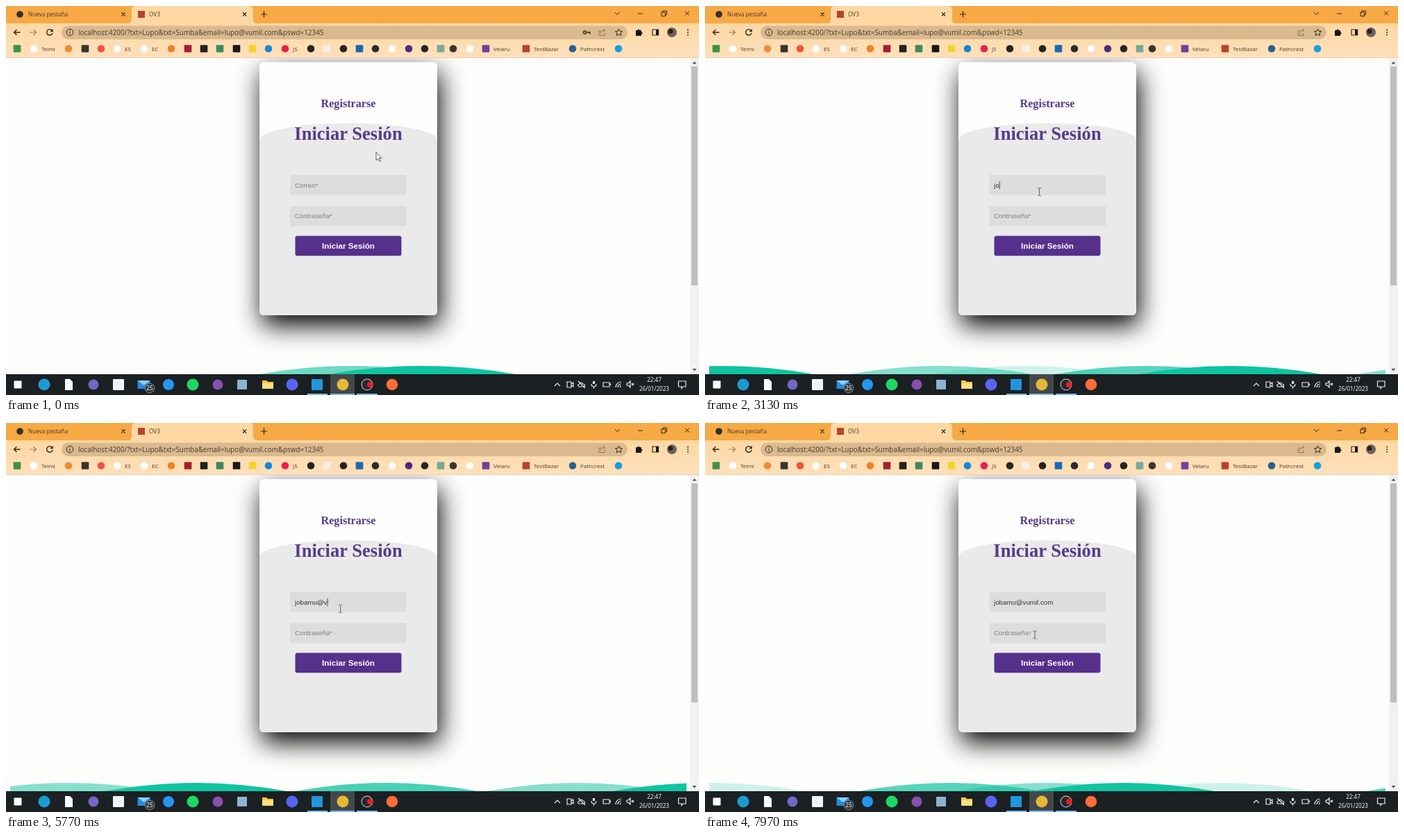
These frames come from a looping animation (998x561 px, 8000 ms). An HTML page:

```html
<!DOCTYPE html>
<html lang="es">
<head>
<meta charset="utf-8">
<title>Iniciar Sesión</title>
<style>
html, body { margin: 0; width: 100%; height: 100%; overflow: hidden; background: #fdfdfc; }
svg { display: block; width: 998px; height: 561px; }
text { white-space: pre; }
.ui { font-family: "Open Sans", "Noto Sans", sans-serif; }
.form { font-family: "Liberation Sans", Arial, sans-serif; font-size: 9.7px; }
.head { font-family: "Liberation Serif", Times, serif; font-weight: bold; fill: #573b8a; text-anchor: middle; }
.line { fill: none; stroke-width: 1.2; }
</style>
</head>
<body>
<svg viewBox="0 0 998 561">
  <defs>
    <filter id="blur" x="-40%" y="-40%" width="180%" height="180%"><feGaussianBlur stdDeviation="18.3"/></filter>
    <clipPath id="pageClip"><path d="M0 75H985V531H0Z"/></clipPath>
    <clipPath id="waveClip"><path d="M6 510H980V531H6Z"/></clipPath>
    <linearGradient id="bar" x2="0" y2="1"><stop stop-color="#fdd8a3"/><stop offset="1" stop-color="#fee0bc"/></linearGradient>
  </defs>
  <rect width="998" height="561" fill="#fdfdfc"/>

  <g clip-path="url(#pageClip)">
    <rect x="368.700" y="95.600" width="256" height="365" rx="6" filter="url(#blur)"/>
    <g id="waves" clip-path="url(#waveClip)" fill="#10c4a0"></g>
  </g>
  <rect x="365" y="81" width="256" height="365" rx="6" fill="#fefefe"/>
  <path d="M365 193A128 24 0 0 1 621 193V440a6 6 0 0 1-6 6H371a6 6 0 0 1-6-6Z" fill="#eaeaea"/>
  <text class="head" x="493" y="146" font-size="16.2">Registrarse</text>
  <text class="head" x="493" y="193" font-size="26.6">Iniciar Sesión</text>
  <g fill="#dedddd">
    <rect x="409" y="243.500" width="168" height="29" rx="3"/>
    <rect x="409" y="288.500" width="168" height="29" rx="3"/>
  </g>
  <text class="form" id="mail" x="416" y="262"></text>
  <text class="form" x="416" y="306" fill="#808080">Contraseña*</text>
  <path id="caret" d="M0 253V264" stroke="#222" stroke-width=".8"/>
  <rect x="416.500" y="331.500" width="153" height="28.700" rx="3" fill="#55318b"/>
  <text class="form" x="493" y="349.500" text-anchor="middle" style="font-size:11.7px" font-weight="bold" fill="#fff">Iniciar Sesión</text>

  <g id="list">
    <path d="M485 281L492 274L499 281Z" fill="#23272a"/>
    <rect id="panel" x="477" y="280" width="158" rx="2" fill="#23272a"/>
  </g>

  <rect x="985" y="75" width="13" height="456" fill="#f1f1f1"/>
  <rect x="987" y="87" width="9" height="316" fill="#bfbfbf"/>
  <path d="M988.500 83.500l3-3.500 3 3.500ZM988.500 523l3 3.500 3-3.500Z" fill="#555"/>

  <g id="browser" class="ui" font-size="8.2" fill="#4a3a28">
    <rect width="998" height="26" fill="#f7a945"/>
    <rect y="25" width="998" height="50" fill="url(#bar)"/>
    <path d="M175 25q6 0 6-6V6q0-6 6-6H350q6 0 6 6v13q0 6 6 6Z" fill="#fdd8a3"/>
    <rect x="80" y="28.500" width="815" height="19.500" rx="9.700" fill="#dab98f"/>
    <circle cx="20" cy="12" r="4.800" fill="#33302c"/>
    <rect x="190" y="7" width="10" height="10" fill="#b5442e"/>
    <text x="32" y="15">Nueva pestaña</text>
    <text x="206" y="15">OV3</text>
    <text x="104" y="41.500" font-size="9.900" id="url"></text>
    <g class="line" stroke="#2e2519">
      <path d="M166.500 9.500l5 5m0-5l-5 5M341 9.500l5 5m0-5l-5 5M367 12h9m-4.500-4.500v9"/>
      <path d="M877 9l3.500 3.500L884 9M910 11h7M944 9h5.500v5.500H944ZM946 9V7h5.500v5.500h-2M978 7.500l6 6m0-6l-6 6" stroke-width="1"/>
      <path d="M20.500 38h-9m4-4l-4 4 4 4M66.500 35.500a4.300 4.300 0 1 0 .6 3.500m0-5.500v3h-3" stroke-width="1.400"/>
      <path d="M34.500 38h9m-4-4l4 4-4 4" stroke="#a17d55"/>
      <circle cx="92" cy="38" r="4.800" stroke-width="1"/><path d="M92 37v3.500m0-5.500v1" stroke-width="1"/>
      <path d="M857 36h-3v6.500h8V39M856.500 40q0-5 6-5m-2-2l2.500 2-2.500 2" stroke="#8d7558" stroke-width="1"/>
      <path d="M882.500 33l1.500 3.300 3.600.4-2.700 2.400.8 3.500-3.200-1.800-3.200 1.800.8-3.500-2.700-2.400 3.600-.4Z" stroke-width="1"/>
      <path d="M931 34h8.500v8H931Z"/>
    </g>
    <g id="key" fill="none" stroke="#5b4931" stroke-width="1.800"><circle cx="833.500" cy="38" r="2"/><path d="M836 38h5v2.500"/></g>
    <path d="M907 35h2.500a1.500 1.500 0 0 1 3 0h2.500v2.500a1.500 1.500 0 0 1 0 3v2.500h-8ZM936 34h4v8h-4Z" fill="#191510"/>
    <circle cx="959" cy="38" r="7" fill="#6d625c"/><circle cx="957" cy="36.500" r="3.500" fill="#27221f"/>
    <g fill="#2e2519"><circle cx="982" cy="34.500" r="1"/><circle cx="982" cy="38" r="1"/><circle cx="982" cy="41.500" r="1"/></g>
    <path d="M0 74.500H998" stroke="#edcfa8"/>
  </g>

  <g id="taskbar" class="ui" font-size="8.100" fill="#fff">
    <rect y="531" width="998" height="30" fill="#1b2023"/>
    <rect x="467" y="531" width="35" height="30" fill="#43484b"/>
    <path d="M434 560h29M467 560h35M505 560h30" stroke="#76b9ed" stroke-width="2"/>
    <path d="M85 538h7l4 4v12H85Z"/>
    <path d="M369 540h6l2 2h8v10h-16Z" fill="#f5c84c"/><path d="M369 544h16v8h-16Z" fill="#ffdf80"/>
    <path d="M189.500 540h18v12h-18Z" fill="#218ce0"/><path d="M189.500 540l9 7 9-7" fill="#8cd0ff"/>
    <g class="line" stroke="#eee" stroke-width="1">
      <path d="M790 548l4-4 4 4"/>
      <path d="M808 542h6v8h-6ZM814 545l3-2v6l-3-2"/>
      <path d="M825 549h8q2-3-2-4-3-4-5 0-4 1-1 4ZM824 541l10 10"/>
      <path d="M843 545q0 4 3.500 4t3.500-4m-3.500 4v3"/><path d="M846.500 541v4" stroke-width="3"/>
      <path d="M860 543h9v6h-9ZM869 545h1.500v2"/>
      <path d="M878 550a8 8 0 0 1 8-8M881 550a5 5 0 0 1 5-5M884 550a2 2 0 0 1 2-2"/>
      <path d="M894 544h2l3-3v9l-3-3h-2ZM901 544l3 3m0-3l-3 3"/>
      <path d="M968.500 541h10.500v8h-4l-2 2.500v-2.500h-4.500Z"/>
    </g>
    <g text-anchor="middle"><text x="933.500" y="542">22:47</text><text x="933.500" y="555">26/01/2023</text></g>
  </g>

  <path id="arrow" d="M0 0V11.500L2.700 9l2 4.300 1.800-.8-2-4.200H8Z" fill="#fff" stroke="#333" stroke-width=".8"/>
  <path id="beam" d="M-2.500-5.500h1.800l.7.700.7-.7h1.800M0-5V5M-2.500 5.500h1.800l.7-.7.7.7h1.800" fill="none" stroke="#555" stroke-width=".9"/>
</svg>
<script>
const LOOP = 8000;
const $ = id => document.getElementById(id);

function add(parent, tag, attrs, content = '') {
  const el = document.createElementNS('http://www.w3.org/2000/svg', tag);
  for (const name in attrs) el.setAttribute(name, attrs[name]);
  el.textContent = content;
  parent.append(el);
  return el;
}
function icon(parent, shape, x, y, r, fill) {
  return shape === 'o'
    ? add(parent, 'circle', { cx: x, cy: y, r, fill })
    : add(parent, 'rect', { x: x - r, y: y - r, width: 2 * r, height: 2 * r, rx: 1, fill });
}

$('url').textContent = 'localhost:4200/?txt=Lupo&txt=Sumba&email=lupo@vumil.com&pswd=12345';

// Bookmarks: shape, x, colour, optional label
[
  ['s', 16, '#3f9142'], ['o', 40, '#fff', 'Telmi'], ['o', 90, '#ef8a35'], ['s', 114, '#38342d'],
  ['o', 137, '#f0523d'], ['o', 160, '#fff', 'ES'], ['o', 199, '#fff', 'EC'], ['o', 238, '#f08022'],
  ['s', 262, '#a41e2d'], ['s', 285, '#24201d'], ['s', 308, '#3b8962'], ['s', 332, '#171717'],
  ['s', 355, '#f2d52c'], ['o', 378, '#1686d9'], ['o', 402, '#e91e50', 'JS'], ['o', 439, '#262320'],
  ['s', 462, '#f3eee8'], ['o', 486, '#27231f'], ['s', 509, '#1769b5'], ['o', 532, '#2b2b2a'],
  ['o', 556, '#fff'], ['o', 580, '#4b2a82'], ['o', 603, '#27231f'], ['s', 626, '#76aa98'],
  ['o', 644, '#383530'], ['o', 668, '#fff'], ['s', 691, '#6f3f9c', 'Velaru'],
  ['s', 749, '#b5442e', 'TestBazar'], ['o', 816, '#28628b', 'Pathcrest'], ['o', 882, '#139fdd']
].forEach(([shape, x, fill, label]) => {
  icon($('browser'), shape, x, 61.5, 5.3, fill);
  if (label) add($('browser'), 'text', { x: x + 11, y: 64.5, 'font-size': 8 }, label);
});

// Taskbar: shape, x, radius, colour
[
  ['s', 17, 5.5, '#fff'], ['o', 55, 8.5, '#1d9bd1'], ['o', 126, 7.5, '#7565c5'], ['s', 162, 8, '#eef3f6'],
  ['o', 234, 8, '#2496ed'], ['o', 269, 8.5, '#1ed760'], ['o', 305, 7.5, '#8751ad'], ['s', 340, 7, '#8eb3d0'],
  ['o', 412, 8.5, '#5865f2'], ['s', 448, 8, '#2196dd'], ['o', 485, 8.5, '#e4b936'],
  ['o', 520, 8.5, '#b8b8b8'], ['o', 520, 7.3, '#29272b'], ['o', 524, 4, '#ed1c24'], ['o', 556, 8.3, '#ff6c37']
].forEach(([shape, x, r, fill]) => icon($('taskbar'), shape, x, 546, r, fill));
add($('taskbar'), 'circle', { cx: 207, cy: 551, r: 7, fill: '#343b40', stroke: '#91979b', 'stroke-width': .8 });
add($('taskbar'), 'text', { x: 207, y: 554, 'text-anchor': 'middle' }, '25');

// Waves: two pairs drifting in opposite directions; each pair meets at WAVE_CENTER when t = meet
const WAVE_WIDTH = 731, WAVE_CENTER = 548;
const hump = x => `M${x - 131} 531Q${x} 507 ${x + 131} 531Z`;
const humps = [-1, 0, 1].map(i => hump(i * WAVE_WIDTH)).join('');
const waves = [
  { dir: 1, period: 3000, meet: -230, opacity: .7 },
  { dir: 1, period: 4000, meet: 270, opacity: .5 },
  { dir: -1, period: 4000, meet: 270, opacity: 1 },
  { dir: -1, period: 3000, meet: -230, opacity: .2 }
];
for (const wave of waves) wave.el = add($('waves'), 'path', { d: humps, opacity: wave.opacity });

const rows = [
  'junomandel.sumba@norute.es', 'jnsumbavelandoso@cartuvo.es', 'kk@kbdk.es',
  'drtulipo@vumil.com', 'tkt@b.es', 'knrkn@vumil.tarvel'
].map((mail, i) => add($('list'), 'text',
  { class: 'ui', x: 486, y: 299.2 + i * 26.25, 'font-size': 8.9, fill: '#fff' }, mail));

const MAIL = 'jobamu@vumil.com';
const CLICK = 770;
const KEYS = [1700, 2700, 3500, 3800, 4200, 4500, 5300, 5700, 5850, 6000, 6200, 6350, 6550, 6900, 7000, 7150];
const POINTER = [[0, 533, 211], [150, 533, 211], [650, 481.5, 268], [7400, 481.5, 268], [7800, 475, 305.5], [LOOP, 475, 305.5]];

function pointerAt(t) {
  const i = POINTER.findIndex(p => p[0] > t);
  const [t0, x0, y0] = POINTER[i - 1], [t1, x1, y1] = POINTER[i];
  const u = (t - t0) / (t1 - t0), k = u * u * (3 - 2 * u);
  return [x0 + (x1 - x0) * k, y0 + (y1 - y0) * k];
}
const show = (el, on) => el.setAttribute('visibility', on ? 'visible' : 'hidden');

function draw(t) {
  for (const { el, dir, period, meet } of waves) {
    const x = WAVE_CENTER + dir * WAVE_WIDTH * (t - meet) / period;
    const wrapped = ((x % WAVE_WIDTH) + WAVE_WIDTH) % WAVE_WIDTH;
    el.setAttribute('transform', `translate(${wrapped})`);
  }

  const typed = KEYS.filter(k => k <= t).length;
  const mail = $('mail');
  mail.textContent = typed ? MAIL.slice(0, typed) : 'Correo*';
  mail.setAttribute('fill', typed ? '#333' : '#808080');
  const lastInput = typed ? KEYS[typed - 1] : CLICK;
  const caretX = 416.7 + (typed ? mail.getComputedTextLength() : 0);
  $('caret').setAttribute('transform', `translate(${caretX})`);
  show($('caret'), t >= CLICK && (t - lastInput) % 1060 < 535);

  const count = t < CLICK || typed > 1 ? 0 : typed ? 2 : 6;
  show($('list'), count);
  $('panel').setAttribute('height', 5.5 + count * 26.25);
  rows.forEach((row, i) => show(row, i < count));
  show($('key'), !typed);

  const [x, y] = pointerAt(t);
  const overField = (y > 243 && y < 273) || (y > 288 && y < 318);
  for (const id of ['arrow', 'beam']) $(id).setAttribute('transform', `translate(${x} ${y})`);
  show($('beam'), overField);
  show($('arrow'), !overField);
}

const start = performance.now();
function tick() {
  draw((performance.now() - start) % LOOP);
  requestAnimationFrame(tick);
}
tick();
</script>
</body>
</html>
```
